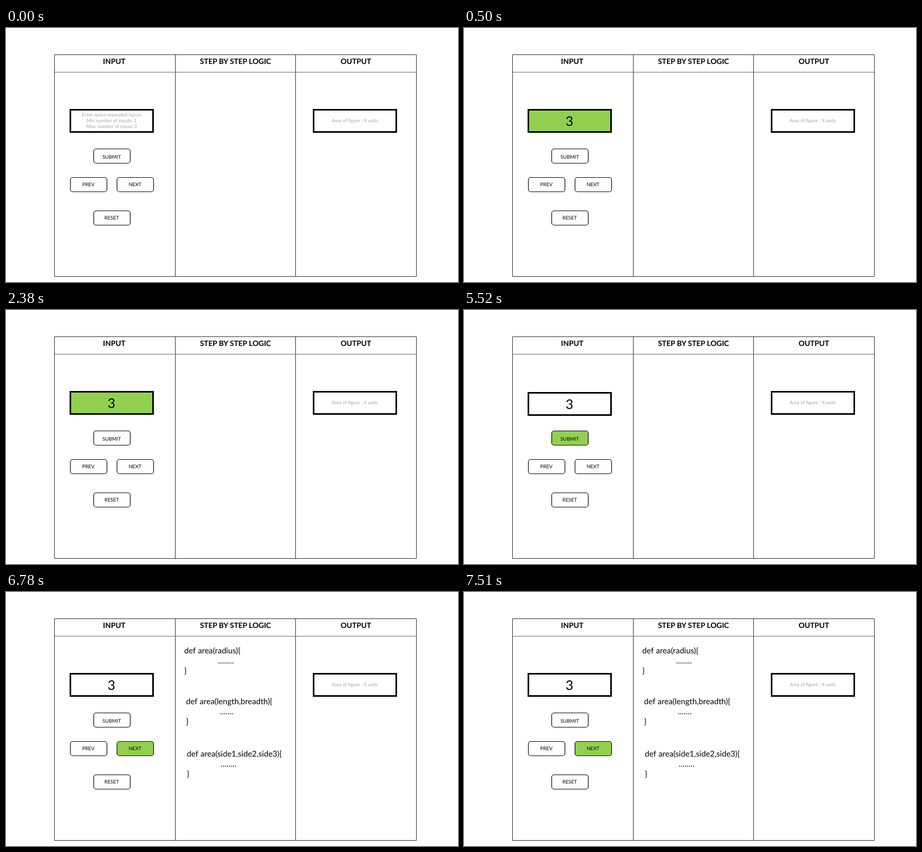
These frames come from a looping animation (853x480 px, 8 s). An HTML page:

```html
<!DOCTYPE html>
<html lang="en">
<head>
<meta charset="utf-8">
<title>Area calculator steps</title>
<style>
  html, body { margin: 0; height: 100%; overflow: hidden; background: #fff; }
  svg { display: block; font-family: Lato, sans-serif; text-rendering: geometricPrecision; }
  .grid { fill: none; stroke: #262626; }
  .head { font-size: 14px; font-weight: 700; text-anchor: middle; }
  .box { fill: #fff; stroke: #000; stroke-width: 3; }
  .button rect { fill: #fff; stroke: #000; stroke-width: 1.2; }
  .button text { font-size: 9.4px; text-anchor: middle; }
  .hint { font-size: 8.8px; word-spacing: .3px; fill: #a3a3a3; text-anchor: middle; }
  .value { font-size: 25px; text-anchor: middle; }
  .code { font-size: 15.1px; word-spacing: .7px; }
  .box.on, .button.on rect { fill: #92d050; }
</style>
</head>
<body>
<svg width="853" height="480" viewBox="0 0 853 480">
  <path class="grid" d="M91.5 50.5H774.5V469.5H91.5ZM319.5 50V469M546.5 50V469"/>
  <path class="grid" d="M92 83.5H774" style="stroke: #666"/>
  <g class="head">
    <text x="204.3" y="68">INPUT</text>
    <text x="433" y="68">STEP BY STEP LOGIC</text>
    <text x="660.3" y="68">OUTPUT</text>
  </g>

  <g id="field">
    <rect class="box" id="fieldBox" x="121.5" y="154.5" width="156" height="42"/>
    <g class="hint" id="prompt">
      <text x="199.3" y="167">Enter space separated inputs</text>
      <text x="199.3" y="178">Min number of inputs: 1</text>
      <text x="199.3" y="189">Max: number of inputs 3</text>
    </g>
    <text class="value" id="value" x="199" y="185">3</text>
  </g>

  <rect class="box" x="580.5" y="154.5" width="156" height="42"/>
  <text class="hint" x="658.3" y="178">Area of figure : X units</text>

  <g id="buttons"></g>
  <g class="code" id="code"></g>
</svg>
<script>
const LOOP = 8000;
const byId = id => document.getElementById(id);

const button = (label, x, y, baseline) => `
  <g class="button" id="${label}">
    <rect x="${x}" y="${y}" width="69" height="27" rx="4.5"/>
    <text x="${x + 34}" y="${baseline}">${label}</text>
  </g>`;

const definition = (args, dots, x, y) => `
  <text x="${x}" y="${y}">def area(${args}){</text>
  <text x="${x + 64}" y="${y + 19}" letter-spacing=".15">${'.'.repeat(dots)}</text>
  <text x="${x}" y="${y + 38}">}</text>`;

byId('buttons').innerHTML =
  button('SUBMIT', 165.5, 228.5, 247) +
  button('PREV', 121.5, 282.5, 299) +
  button('NEXT', 209.5, 282.5, 299) +
  button('RESET', 165.5, 345.5, 362);

byId('code').innerHTML =
  definition('radius', 8, 336.3, 116) +
  definition('length,breadth', 7, 339.7, 212) +
  definition('side1,side2,side3', 8, 341.2, 311);

const show = (id, visible) => byId(id).setAttribute('visibility', visible ? 'visible' : 'hidden');
const highlight = (id, on) => byId(id).classList.toggle('on', on);

function draw(now) {
  const t = now % LOOP;
  const typed = t >= 500, submitted = t >= 3640, stepped = t >= 6780;
  const submitting = submitted && !stepped;
  show('prompt', !typed);
  show('value', typed);
  show('code', stepped);
  highlight('fieldBox', typed && !submitted);
  highlight('SUBMIT', submitting);
  highlight('NEXT', stepped);
  byId('field').setAttribute('transform', `translate(0 ${submitting ? 2 : 0})`);
}

const start = performance.now();
function tick() {
  draw(performance.now() - start);
  requestAnimationFrame(tick);
}
tick();
</script>
</body>
</html>
```
